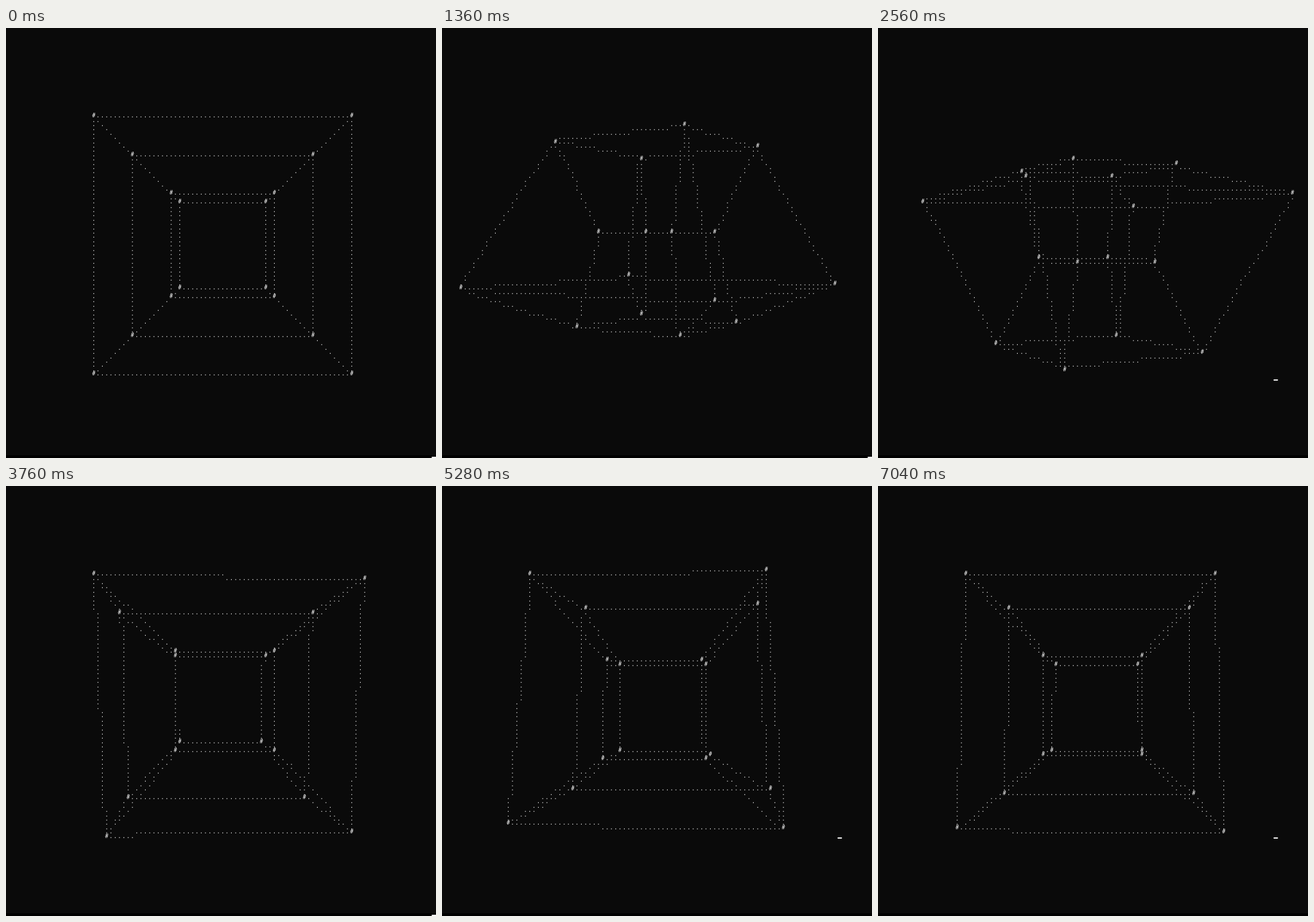
Animation, 640 px wide and 640 px high, one loop 7120 ms. Source, as an HTML page with a canvas:

```html
<!DOCTYPE html>
<html lang="en">
<head>
<meta charset="utf-8">
<title>Rotating tesseract</title>
<style>
  html, body { margin: 0; width: 100%; height: 100%; overflow: hidden; background: #0a0a0a; }
  canvas { display: block; width: 640px; height: 640px; }
</style>
</head>
<body>
<canvas id="stage" width="640" height="640"></canvas>
<script>
const ctx = document.getElementById('stage').getContext('2d');
const LOOP = 7120, TICK = 80;
const CELL = 6.4, MID = 50, SCALE = 150;
const STEP = 0.02;          // radians per turn step
const HOME = [0, 0], WAIT = [92, 81], END = [99, 99];

// Corner i has coordinate +1 on each axis whose bit is set.
const corners = Array.from({ length: 16 }, (_, i) =>
  [0, 1, 2, 3].map(bit => (i >> bit & 1) * 2 - 1));

const edges = [];
for (let i = 0; i < 16; i++)
  for (let bit = 1; bit < 16; bit *= 2)
    if (!(i & bit)) edges.push([i, i | bit]);

// Turn in the xz and yw planes, then project 4D to 3D to 2D.
function project([x, y, z, w], angle) {
  const c = Math.cos(angle), s = Math.sin(angle);
  const w2 = w * c - y * s;
  const near = Math.max(0, w2 - 1);
  const k = 1 / (2.5 - w2 + near * near / 2);
  const f = SCALE * k / (4 - (z * c - x * s) * k);
  return [(x * c + z * s) * f, (y * c + w * s) * f];
}

function put(char, x, y) {
  const col = MID + Math.round(x), row = MID + Math.round(y);
  ctx.fillText(char, col * CELL + 0.2, row * CELL + 5.2);
}

function line([x0, y0], [x1, y1], cells) {
  const n = Math.max(1, Math.ceil(Math.max(Math.abs(x1 - x0), Math.abs(y1 - y0))));
  for (let i = 0; i <= n; i++) {
    const x = x0 + (x1 - x0) * i / n, y = y0 + (y1 - y0) * i / n;
    cells.set(Math.round(x) + ',' + Math.round(y), [x, y]);
  }
}

function cursorAt(n) {
  if ([8, 33, 62, 80, 86].includes(n)) return HOME;
  if ([20, 26, 32, 43].includes(n) || (n > 56 && n < 67) || n > 83) return WAIT;
  return END;
}

function draw(n) {
  ctx.fillStyle = '#0a0a0a';
  ctx.fillRect(0, 0, 640, 640);
  ctx.fillStyle = '#000';
  ctx.fillRect(0, 636, 640, 4);

  const steps = Math.max(0, Math.floor(3.69 * n - 12.7));
  const points = corners.map(p => project(p, steps * STEP));
  const cells = new Map();
  for (const [a, b] of edges) line(points[a], points[b], cells);
  for (const [x, y] of points) cells.delete(Math.round(x) + ',' + Math.round(y));

  ctx.fillStyle = '#fff';
  ctx.font = '8px "DejaVu Sans Mono", monospace';
  for (const [x, y] of cells.values()) put('.', x, y);
  const marks = new Map(points.map(p => [p.map(Math.round).join(), p]));
  for (const [x, y] of marks.values()) put('#', x, y);

  const [col, row] = cursorAt(n);
  ctx.fillRect(col * CELL, row * CELL + 4.6, CELL, 1.8);
}

let shown = -1;
const start = performance.now();
function tick() {
  const n = Math.floor((performance.now() - start) % LOOP / TICK);
  if (n !== shown) draw(shown = n);
  requestAnimationFrame(tick);
}
tick();
</script>
</body>
</html>
```
